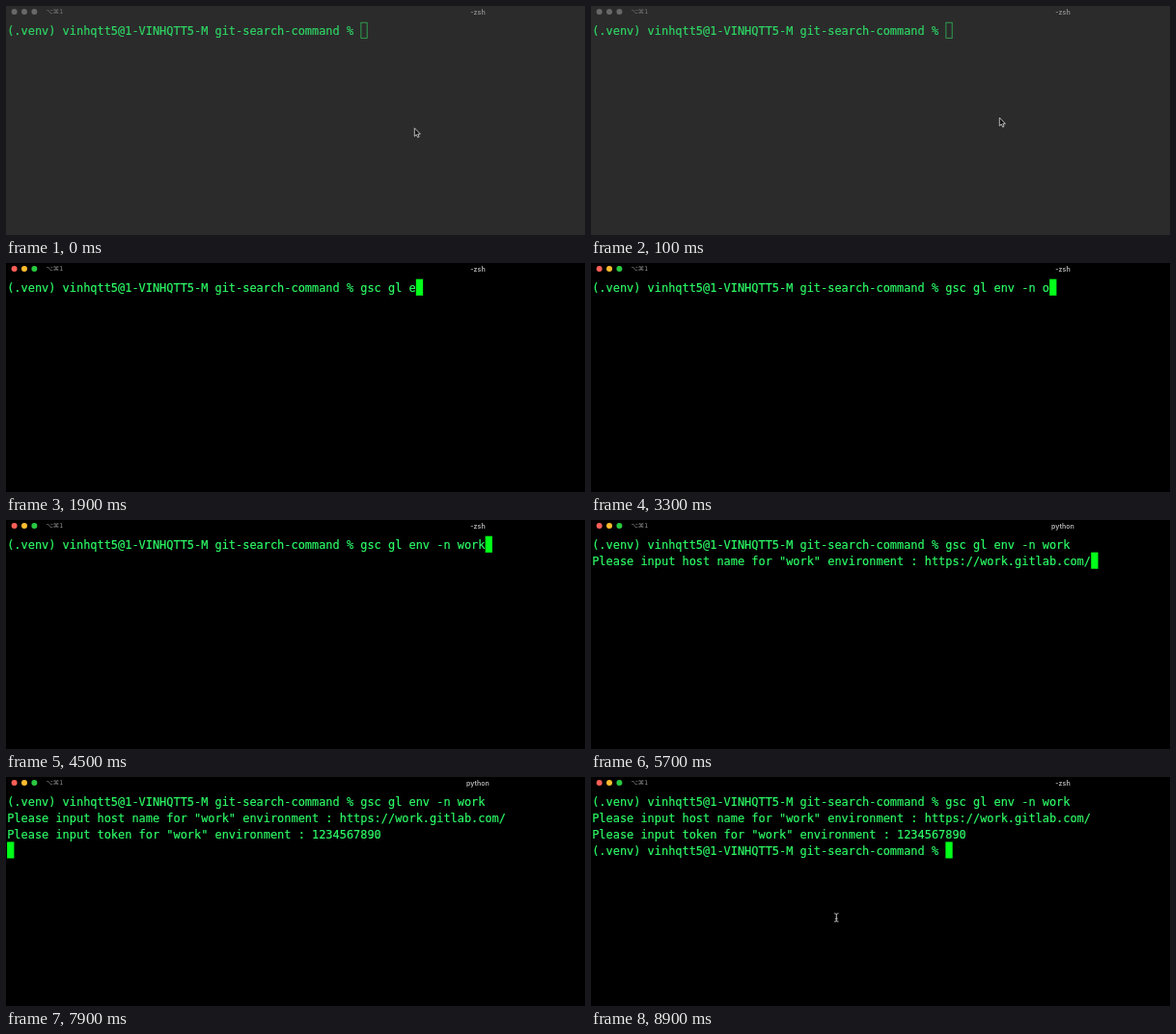
Recreate the animation shown at these times as an HTML page. Size 600 px wide and 238 px high, loop 9 s.

```html
<!DOCTYPE html>
<html lang="en">
<head>
<meta charset="utf-8">
<title>Terminal session</title>
<style>
  html, body { margin: 0; width: 100%; height: 100%; overflow: hidden; background: #000; }
  svg { display: block; width: 600px; height: 238px; }
  .row { font: 11.93px "DejaVu Sans Mono", monospace; white-space: pre; fill: #2dfa66; stroke: #2dfa66; stroke-width: 0.2; }
  .label { font: 600 7px Inter, sans-serif; fill: #b4b4b4; text-anchor: middle; }
  .key { font: 6.4px "DejaVu Sans", sans-serif; fill: #8c8c8c; }
  .idle .row { fill: #2fd565; stroke: #2fd565; }
  .idle .label { fill: #8c8c8c; }
  .idle .key { fill: #767676; }
  .idle .lights circle { fill: #686868; }
</style>
</head>
<body>
<svg id="stage" viewBox="0 0 600 238">
  <rect id="back" width="600" height="238"/>
  <g class="lights">
    <circle cx="8.6" cy="6" r="3" fill="#ff5f57"/>
    <circle cx="19" cy="6" r="3" fill="#febc2e"/>
    <circle cx="29.4" cy="6" r="3" fill="#28c840"/>
  </g>
  <text class="key" x="41.5" y="8.4">⌥⌘1</text>
  <text class="label" id="label" x="489" y="8.5"></text>
  <rect id="caret" stroke-width="0.8"/>
  <text class="row" x="1.2" y="30"></text>
  <text class="row" x="1.2" y="46.9"></text>
  <text class="row" x="1.2" y="63.8"></text>
  <text class="row" x="1.2" y="80.7"></text>
  <path id="arrow" d="M0 0V8.6L2 6.8L3.4 9.8L4.8 9.1L3.5 6.3H6.1Z" fill="#111" stroke="#ddd" stroke-width="0.8"/>
  <path id="beam" d="M-2.2-4.3Q-.3-4.3 0-3.2Q.3-4.3 2.2-4.3M0-3.4V3.4M-2.2 4.3Q-.3 4.3 0 3.2Q.3 4.3 2.2 4.3M-1.4 1.2H1.4" fill="none" stroke="#b0b0b0" stroke-width="1.1"/>
</svg>
<script>
const LOOP = 9000, CELL = 7.182, LEFT = 1.2, TOP = 16.7, PITCH = 16.9;
const PROMPT = '(.venv) vinhqtt5@1-VINHQTT5-M git-search-command % ';
const ask = what => `Please input ${what} for "work" environment : `;

// Terminal stream: [time, characters]; \b removes one character.
const stream = [
  [0, PROMPT],
  [600, 'g'], [800, 's'], [1000, 'c'], [1200, ' '],
  [1400, 'g'], [1600, 'l'], [1700, ' '],
  [1900, 'e'], [2100, 'n'], [2300, 'v'], [2500, ' '],
  [2700, '-'], [2900, 'n'], [3100, ' '],
  [3300, 'o'], [3400, '\b'], [3500, 'w'], [3600, 'o'], [3900, 'r'], [4200, 'k'],
  [4600, '\n'], [5200, ask('host name')],
  [5500, 'https://work.gitlab.com/'],
  [5900, '\n' + ask('token')],
  [6900, '1'], [7100, '2'], [7200, '3'], [7300, '4'], [7400, '56'],
  [7500, '7'], [7600, '89'], [7700, '0'],
  [7800, '\n'], [8300, PROMPT]
];

const $ = id => document.getElementById(id);
const stage = $('stage'), back = $('back'), label = $('label');
const caret = $('caret'), arrow = $('arrow'), beam = $('beam');
const rows = [...document.querySelectorAll('.row')];

const set = (el, attrs) => {
  for (const name in attrs) el.setAttribute(name, attrs[name]);
};

const place = (el, visible, x, y) => set(el, {
  visibility: visible ? 'visible' : 'hidden',
  transform: `translate(${x} ${y})`
});

function screenAt(t) {
  let text = '';
  for (const [time, part] of stream) {
    if (time > t) break;
    text = part === '\b' ? text.slice(0, -1) : text + part;
  }
  return text.split('\n');
}

function draw(ms) {
  const t = Math.floor(ms / 100) * 100;
  const idle = t < 200;
  const lines = screenAt(t);
  const last = lines.length - 1;

  stage.setAttribute('class', idle ? 'idle' : '');
  back.setAttribute('fill', idle ? '#2b2b2b' : '#000');
  label.textContent = t >= 4900 && t < 8300 ? 'python' : '-zsh';
  rows.forEach((row, i) => { row.textContent = lines[i] || ''; });

  const inset = idle ? 0.5 : 0;
  set(caret, {
    x: LEFT - 0.1 + lines[last].length * CELL + inset,
    y: TOP + last * PITCH + inset,
    width: 7.3 - 2 * inset,
    height: 17.1 - 2 * inset,
    fill: idle ? 'none' : '#00ff19',
    stroke: idle ? '#2fb956' : 'none'
  });

  place(arrow, idle, 423.3, t < 100 ? 126.8 : 116);
  const late = t >= 8400;
  place(beam, late || (!idle && t < 600), late ? 254.3 : 420, late ? 146 : 105);
}

const start = performance.now();
function tick() {
  draw((performance.now() - start) % LOOP);
  requestAnimationFrame(tick);
}
tick();
</script>
</body>
</html>
```
